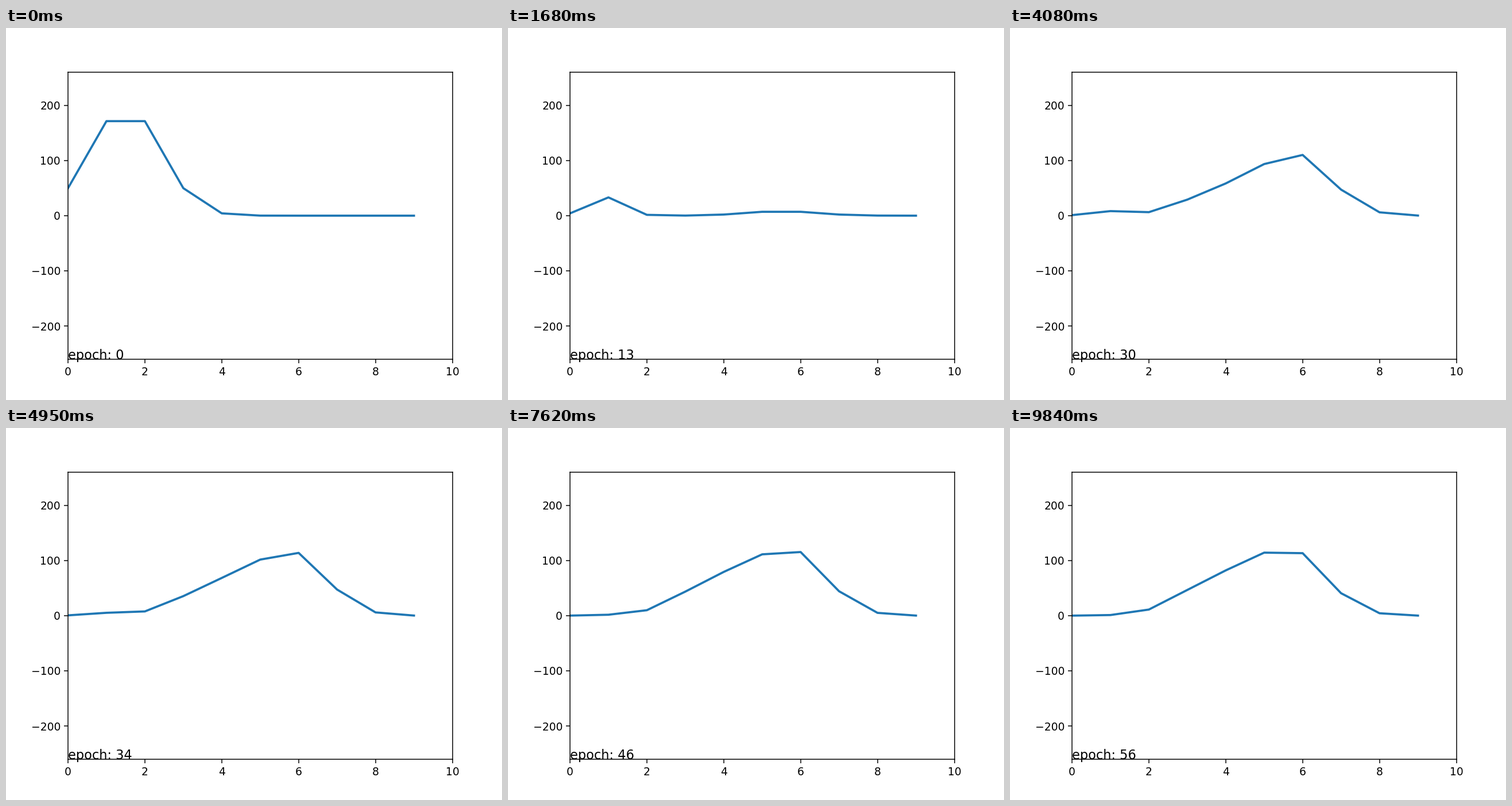
Recreate the animation shown at these times as a matplotlib script. Size 864 px wide and 648 px high, loop 9.87 s.

```python
import numpy as np
import matplotlib.pyplot as plt
from matplotlib.animation import FuncAnimation

FRAMES, INTERVAL = 329, 30

x = np.arange(10)


def bump(height, center, width):
    return height * np.exp(-(x - center) ** 2 / (2 * width ** 2))


def fading(i):
    """First hump: shrinks and narrows steadily, then dies away."""
    p = min(i / 56, 1)
    height = 200 - 166 * p
    tail = np.exp(-0.018 * max(i - 56, 0))
    return bump(height * tail, 1.5 - 0.6 * p, 0.9 - 0.46 * p)


def settled(i):
    return 1 - np.exp(-max(i - 80, 0) / 46)


def growing(i):
    """Main hump: rises quickly, then drifts back a little."""
    height = 89 / (1 + np.exp((72 - i) / 7)) + 26 * settled(i)
    center = np.interp(i, [56, 100, 328], [5.5, 5.87, 5.7])
    return bump(height, center, 0.9)


def shoulder(i):
    center = np.interp(i, [108, 328], [3.95, 3.8])
    return bump(64.5 * settled(i), center, 0.96)


def curve(i):
    return fading(i) + growing(i) + shoulder(i)


def epoch(i):
    """Epochs pass quickly at first, then at about half that pace."""
    return int(np.interp(i, [0, 107, 328], [0, 26.1, 56.8]))


fig, ax = plt.subplots(figsize=(6.4, 4.8), dpi=135)
fig.subplots_adjust(top=0.881)
ax.set_xlim(0, 10)
ax.set_ylim(-260, 260)
line, = ax.plot(x, curve(0), lw=2, color="#1f77b4")
label = ax.text(0, -260, "epoch: 0", fontsize=12)


def update(i):
    line.set_ydata(curve(i))
    label.set_text(f"epoch: {epoch(i)}")
    return line, label


anim = FuncAnimation(fig, update, frames=FRAMES, interval=INTERVAL,
                     repeat=True, repeat_delay=0)
plt.show()
```
